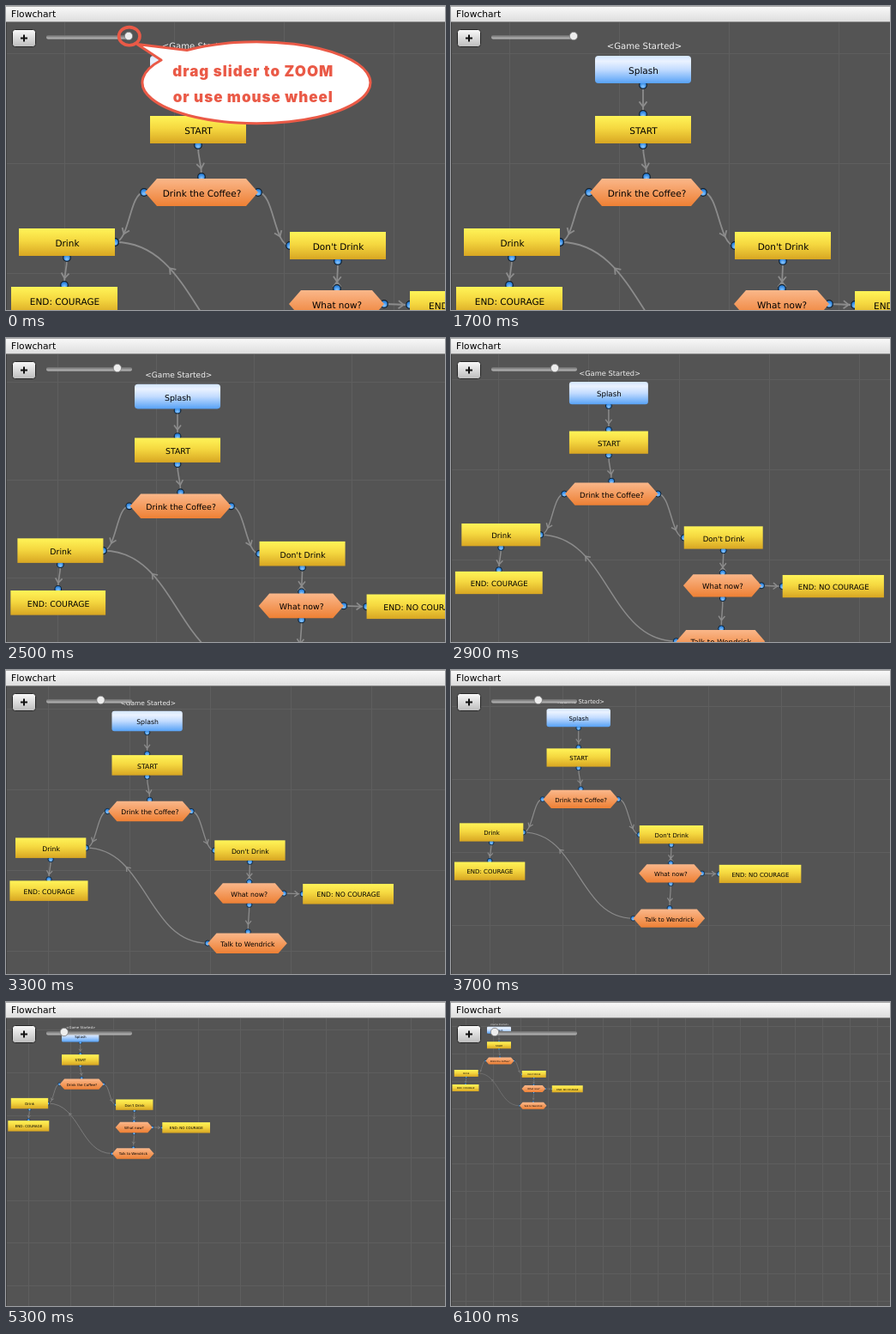
An HTML page for the animation above (6.5 s loop, 512 px wide and 354 px high).

```html
<!DOCTYPE html>
<html lang="en">
<head>
<meta charset="utf-8">
<title>Flowchart zoom</title>
<style>
@property --s { syntax: "<number>"; inherits: true; initial-value: 1; }
html, body { margin: 0; width: 100%; height: 100%; overflow: hidden; background: #545454; }
svg { display: block; width: 512px; height: 354px; animation: zoom 6.5s step-end infinite; }
text { font-family: "DejaVu Sans", "Lucida Grande", sans-serif; font-size: 10.5px; }
#chart { transform-origin: 0 19px; transform: scale(var(--s)); }
#chart text { text-anchor: middle; text-rendering: geometricPrecision; }
#grid { stroke: #5e5e5e; vector-effect: non-scaling-stroke; shape-rendering: crispEdges; }
#edges { fill: none; stroke: #8c8c8c; stroke-width: 1.8; }
#dots { fill: url(#dot); stroke: #10202f; stroke-width: 1.2; }
#knob { transform: translateX(calc((var(--s) - 1) * 122.67px)); }
#hint { animation: hint 6.5s step-end infinite; }
#hint path, #hint ellipse { stroke: #ea5a47; }
#hint text { font: 900 17px Inter, "Liberation Sans", sans-serif; letter-spacing: 1px; fill: #ea5a47; text-anchor: middle; }
@keyframes hint { 0% { visibility: visible; } 26.154%, 100% { visibility: hidden; } }
@keyframes zoom {
  0% { --s: 1; }
  32.308% { --s: .95; }
  38.462% { --s: .893; }
  44.615% { --s: .821; }
  50.769% { --s: .735; }
  56.923% { --s: .664; }
  63.077% { --s: .576; }
  69.231% { --s: .518; }
  75.385% { --s: .444; }
  81.538% { --s: .387; }
  87.692% { --s: .309; }
  93.846%, 100% { --s: .25; }
}
</style>
</head>
<body>
<svg viewBox="0 0 512 354">
  <defs>
    <linearGradient id="yellow" x2="0" y2="1">
      <stop stop-color="#fff458"/><stop offset=".45" stop-color="#f5d840"/><stop offset="1" stop-color="#d8a622"/>
    </linearGradient>
    <linearGradient id="orange" x2="0" y2="1">
      <stop stop-color="#fab78a"/><stop offset="1" stop-color="#ee8034"/>
    </linearGradient>
    <linearGradient id="blue" x2="0" y2="1">
      <stop stop-color="#d3e6ff"/><stop offset=".2" stop-color="#eaf2ff"/><stop offset=".5" stop-color="#c3dcff"/><stop offset="1" stop-color="#57a2f6"/>
    </linearGradient>
    <linearGradient id="bar" x2="0" y2="1">
      <stop stop-color="#fafafa"/><stop offset="1" stop-color="#dedede"/>
    </linearGradient>
    <linearGradient id="button" x2="0" y2="1">
      <stop stop-color="#fafafa"/><stop offset="1" stop-color="#bcbcbc"/>
    </linearGradient>
    <linearGradient id="track" x2="0" y2="1">
      <stop stop-color="#6c6c6c"/><stop offset="1" stop-color="#bdbdbd"/>
    </linearGradient>
    <radialGradient id="dot" cy=".7">
      <stop stop-color="#8cc8ff"/><stop offset="1" stop-color="#2f86e0"/>
    </radialGradient>
  </defs>
  <rect width="512" height="354" fill="#545454"/>
  <g id="chart">
    <path id="grid"/>
    <g id="edges"></g>
    <g id="dots"></g>
    <g id="nodes"></g>
    <text x="225.5" y="49.5" fill="#f0f0f0" style="font-size:10.1px">&lt;Game Started&gt;</text>
  </g>
  <rect y="19" width="1" height="335" fill="#404040"/>
  <rect width="512" height="18" fill="url(#bar)"/>
  <rect width="512" height="1" fill="#a8a8a8"/>
  <rect y="18" width="512" height="1" fill="#8a8a8a"/>
  <text x="6" y="13" style="font-size:10.7px">Flowchart</text>
  <rect x="7.5" y="27.5" width="27" height="20" rx="3" fill="url(#button)" stroke="#262626"/>
  <path d="M17 37.5h8M21 33.5v8" stroke="#111" stroke-width="2"/>
  <rect x="47" y="34" width="100" height="4.5" rx="2" fill="url(#track)"/>
  <circle id="knob" cx="143" cy="35" r="4.7" fill="#ededed" stroke="#777" stroke-width=".8"/>
  <g id="hint">
    <path d="M153 44.5L211 51.5A133 47.5 0 1 1 181 63Z" fill="#fff" stroke-width="3" stroke-linejoin="round"/>
    <ellipse cx="143.8" cy="35.2" rx="12.2" ry="10.6" fill="none" stroke-width="3.6"/>
    <text x="288.3" y="82">drag slider to ZOOM</text>
    <text x="288.3" y="112">or use mouse wheel</text>
  </g>
</svg>
<script>
const NS = "http://www.w3.org/2000/svg";
const $ = id => document.getElementById(id);

function add(parent, tag, attrs, text) {
  const el = document.createElementNS(NS, tag);
  for (const k in attrs) el.setAttribute(k, attrs[k]);
  if (text) el.textContent = text;
  return $(parent).appendChild(el);
}

let grid = "";
for (let k = 0; k < 17; k++) {
  grid += `M${68 + 128 * k} 0V1400M0 ${55 + 128 * k}H2100`;
}
$("grid").setAttribute("d", grid);

// label, fill, left, top, width
const nodes = [
  ["Splash", "blue", 168, 58, 112],
  ["START", "yellow", 168, 128, 112],
  ["Drink the Coffee?", "orange", 162, 201, 132],
  ["Drink", "yellow", 15, 259, 112],
  ["Don't Drink", "yellow", 331, 263, 112],
  ["END: COURAGE", "yellow", 6, 327, 124],
  ["What now?", "orange", 330, 331, 111],
  ["END: NO COURAGE", "yellow", 471, 332, 144],
  ["Talk to Wendrick", "orange", 320, 410, 126]
];
for (const [label, kind, x, y, w] of nodes) {
  const fill = `url(#${kind})`;
  if (kind === "orange") {
    add("nodes", "path", { fill, d: `M${x} ${y + 16}l14 -16h${w - 28}l14 16l-14 16h${28 - w}z` });
  } else {
    add("nodes", "rect", { fill, x, y, width: w, height: 32, rx: kind === "blue" ? 4 : 0 });
  }
  add("nodes", "text", { x: x + w / 2 + .5, y: y + 21 }, label);
}

// Cubic link whose handles leave along one axis, with an open arrow at t = 0.7
function link(x0, y0, x1, y1, vertical) {
  const hx = vertical ? 0 : (x1 - x0) / 2, hy = vertical ? (y1 - y0) / 2 : 0;
  const at = (a, b, h, t) => {
    const u = 1 - t;
    return u * u * u * a + 3 * u * u * t * (a + h) + 3 * u * t * t * (b - h) + t * t * t * b;
  };
  const point = t => [at(x0, x1, hx, t), at(y0, y1, hy, t)];
  add("edges", "path", { d: `M${x0} ${y0}C${x0 + hx} ${y0 + hy} ${x1 - hx} ${y1 - hy} ${x1} ${y1}` });
  const [px, py] = point(.7), [qx, qy] = point(.71);
  arrow(px, py, Math.atan2(qy - py, qx - px) * 180 / Math.PI);
  for (const [cx, cy] of [[x0, y0], [x1, y1]]) add("dots", "circle", { cx, cy, r: 4.3 });
}

function arrow(x, y, angle) {
  add("edges", "path", { d: "M-3 -4.5L3 0L-3 4.5", transform: `translate(${x} ${y}) rotate(${angle})` });
}

link(224, 92, 224, 126, true);
link(224, 162, 228, 199, true);
link(161, 217, 127, 275);
link(294, 217, 331, 279);
link(71, 293, 68, 325, true);
link(387, 297, 386, 329, true);
arrow(386, 324, -90);
link(441, 347, 471, 348);
link(386, 365, 384, 408, true);
link(320, 426, 127, 275);
</script>
</body>
</html>
```
